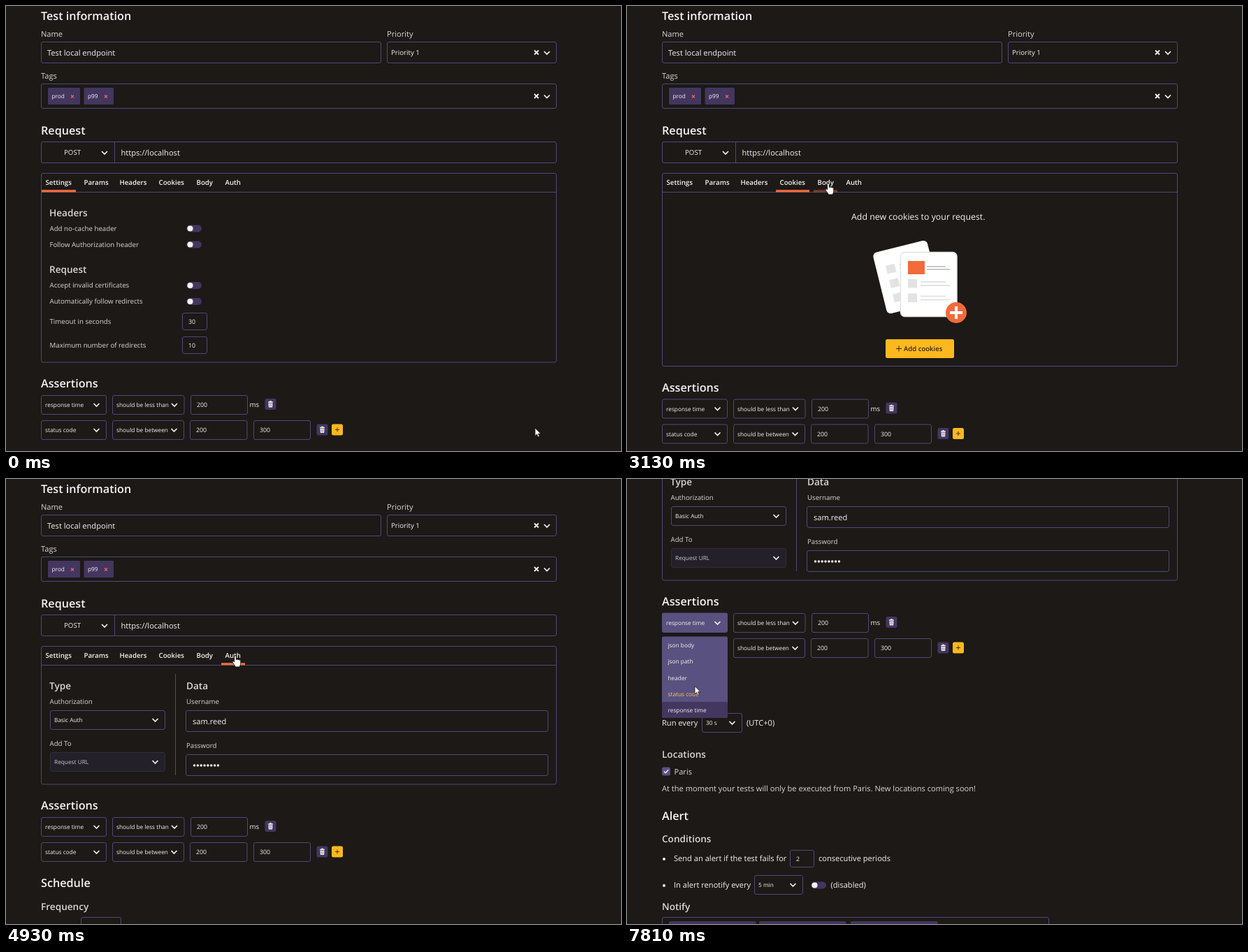
Recreate the animation shown at these times as an HTML page. Size 880x637 px, loop 8000 ms.

```html
<!DOCTYPE html>
<html lang="en">
<head>
<meta charset="utf-8">
<title>Test editor</title>
<style>
html, body { margin: 0; width: 100%; height: 100%; overflow: hidden; background: #1c1917; }
svg { display: block; font-family: "Open Sans", "Noto Sans", sans-serif; text-rendering: geometricPrecision; }
.code { font-family: "Noto Sans Mono", "DejaVu Sans Mono", monospace; }
</style>
</head>
<body>
<svg id="stage" width="880" height="637" viewBox="0 0 880 637"></svg>
<script>
const BG = '#1c1917', LINE = '#504876', PURPLE = '#43365f', LIGHT = '#59517f';
const WHITE = '#f5f3f3', SOFT = '#d9d6d4', YELLOW = '#fdb81e', ORANGE = '#f26b3a';
const DIM_BG = '#24202a', DIM_LINE = '#322d3b';

// Drawing helpers; a text's y is the middle of its capitals.
const esc = s => s.replace(/&/g, '&amp;').replace(/</g, '&lt;');
const text = (x, y, s, size = 11.1, fill = WHITE, weight = 400) =>
  `<text x="${x}" y="${y + size * .357}" font-size="${size}" fill="${fill}" font-weight="${weight}">${esc(s)}</text>`;
const title = (x, y, s) => text(x, y, s, 16.2, WHITE, 600);
const subtitle = (x, y, s) => text(x, y, s, 13.6, SOFT, 600);
const label = (x, y, s) => text(x, y, s, 9.7, SOFT);
const small = (x, y, s, fill) => text(x, y, s, 8.3, fill);
const rect = (x, y, w, h, fill, r = 0, more = '') =>
  `<rect x="${x}" y="${y}" width="${w}" height="${h}" rx="${r}" fill="${fill}" ${more}/>`;
const path = (d, stroke = WHITE, width = 1.6, fill = 'none') =>
  `<path d="${d}" stroke="${stroke}" stroke-width="${width}" fill="${fill}"/>`;
const dot = (x, y, r, fill = WHITE) => `<circle cx="${x}" cy="${y}" r="${r}" fill="${fill}"/>`;
const box = (x, y, w, h, fill = 'none', stroke = LINE) =>
  rect(x + .5, y + .5, w, h, fill, 2.5, `stroke="${stroke}"`);
const chevron = (x, y) => path(`M${x - 4} ${y - 2}l4 4 4-4`, WHITE, 1.7);
const cross = (x, y, r, color = WHITE, width = 1.8) =>
  path(`M${x - r} ${y - r}l${2 * r} ${2 * r}m0 ${-2 * r}l${-2 * r} ${2 * r}`, color, width);
const plus = (x, y, r, color, width) =>
  path(`M${x - r} ${y}h${2 * r}M${x} ${y - r}v${2 * r}`, color, width);
const select = (x, y, w, s, fill) =>
  box(x, y, w, 27, fill) + small(x + 6, y + 14.2, s) + chevron(x + w - 13.5, y + 14);
const input = (x, y, w, h, s) => box(x, y, w, h) + text(x + 9, y + h / 2 + .7, s, 8.8);
const toggle = (x, y) => rect(x, y - 5, 21.5, 10, PURPLE, 5) + dot(x + 5, y, 4.1);
const check = (x, y) => rect(x - 6, y - 6, 12, 12, LIGHT, 2.5) + path(`M${x - 3} ${y}l2.2 2.2 4-4.4`, WHITE, 1.5);
const trash = (x, y) => rect(x, y - 8, 16, 16, PURPLE, 2.5) +
  path(`M${x + 4.6} ${y - 3}h6.8M${x + 6.6} ${y - 4.2}h2.8`, WHITE, 1.3) +
  path(`M${x + 5} ${y - 1.6}h6l-.4 6h-5.2z`, 'none', 0, WHITE) +
  path(`M${x + 7} ${y - .6}v4m2-4v4`, PURPLE, .6);
const add = (x, y) => rect(x, y - 8, 16, 16, YELLOW, 2.5) + plus(x + 8, y, 3, '#4a3517', 1);
const group = (id, s) => `<g id="${id}">${s}</g>`;

const tabs = [
  ['Settings', 51, 100, 510], ['Params', 106, 151, 515.5], ['Headers', 157, 207, 557.5],
  ['Cookies', 213, 261, 515.5], ['Body', 267, 301, 665], ['Auth', 308, 342, 437]
].map(([name, left, right, bottom]) => ({ name, left, right, bottom }));

const tag = (x, w, s) => rect(x, 117, w, 24, PURPLE, 1.5) + small(x + 5.5, 129.5, s) +
  cross(x + w - 11, 129.5, 2, '#f2605c', 1.3);

const form = title(50, 14.5, 'Test information') +
  text(50, 40.5, 'Name', 11.1, SOFT) + box(50, 51, 486, 30) + text(59, 67, 'Test local endpoint') +
  text(545, 40.5, 'Priority', 11.1, SOFT) + box(545, 51, 242, 30) + text(551, 67, 'Priority 1', 9.7) +
  cross(759, 66.5, 3) + chevron(774, 67) +
  text(50, 100, 'Tags', 11.1, SOFT) + box(50, 111, 737, 35) + tag(60, 46, 'prod') + tag(111.5, 42.5, 'p99') +
  cross(759, 129, 3) + chevron(774, 129.5) +
  title(50, 178, 'Request') + box(50, 194, 737, 30) + path('M155.5 194.5v30', LINE, 1) +
  text(83, 210, 'POST', 9.7) + chevron(141, 210) + text(164.5, 210, 'https://localhost') +
  tabs.map(t => text(t.left + 5.5, 252.5, t.name, 9.7, WHITE, 600)).join('') +
  path('M50.5 266.5h737', LINE, 1);

const settings = subtitle(62, 296, 'Headers') + subtitle(62, 377.5, 'Request') +
  [['Add no-cache header', 318.5], ['Follow Authorization header', 341.5],
   ['Accept invalid certificates', 400], ['Automatically follow redirects', 423]]
    .map(([s, y]) => label(62.5, y, s) + toggle(258.5, y)).join('') +
  label(62.5, 452, 'Timeout in seconds') + input(252, 439, 35, 24, '30') +
  label(62.5, 485.5, 'Maximum number of redirects') + input(252, 473, 35, 24, '10');

const GREY = '#e3e3e3';
const sheet = `<g transform="translate(351 354) rotate(-14)">${rect(0, 0, 80, 90, '#fff', 6) +
  [12, 33, 54].map((y, i) => rect(14, y + 10, 13, 12, GREY) +
    path(`M33 ${y + 13}h30m-30 5h30`, GREY, 2)).join('')}</g>` +
  rect(391.5, 352.5, 80.5, 92, '#fff', 6, `stroke="${GREY}" stroke-width="1.5"`) +
  rect(402, 365, 24, 19, ORANGE) + path('M429 373h27m-27 4h33', '#c8c8c8', 2) +
  [391, 411.5].map(y => rect(402, y, 13, 12.5, GREY) +
    path(`M420 ${y + 4}h36m-36 5h42`, GREY, 2)).join('') +
  dot(471, 439, 15, ORANGE) + plus(471, 439, 9, '#fff', 4);
const empty = (x, what, bx, bw) => text(x, 301.5, `Add new ${what} to your request.`, 12.35) + sheet +
  rect(bx, 477, bw, 27, YELLOW, 2.5) + plus(bx + 19, 490.5, 4, '#33260f', 1) +
  text(bx + 26, 491, 'Add ' + what, 9.55, '#33260f', 600);

const fields = [['Owl-Duty-Id', '<set when request is sent>'], ['Host', '<set when request is sent>'],
  ['User-Agent', 'OwlDuty'], ['Accept', '*/*'], ['Accept-Encoding', 'gzip, deflate, br'],
  ['Connection', 'keep-alive'], ['Content-type', 'application/json']];
const headers = text(86, 285.5, 'KEY', 8.3, WHITE, 600) + text(317, 285.5, 'VALUE', 8.3, WHITE, 600) +
  fields.map((pair, i) => {
    const y = 314.8 + i * 36.45, last = i == 6;
    const cell = (x, s) => box(x, Math.round(y - 13), 217, 24, last ? BG : DIM_BG, last ? LINE : DIM_LINE) +
      small(x + 9, y + .3, s, last ? WHITE : '#cbc7cd');
    return check(68.5, y) + cell(83, pair[0]) + cell(311.5, pair[1]);
  }).join('') + trash(537.5, 533.5) + add(559.5, 533.5);

const user = [{
  id: 1, name: 'Marisa Tolver', username: 'Olin', email: 'Mellow@quill.test',
  address: {
    street: 'Fenro Court', suite: 'Apt. 417', city: 'Gwenborough', zipcode: '40317-2065',
    geo: { lat: '-37.3159', lng: '81.1496' }
  },
  phone: '1-555-010-0142 x30917', website: 'hildegard.org',
  company: {
    name: 'Romaguera-Crona', catchPhrase: 'Multi-layered client-server neural-net',
    bs: 'harness real-time e-markets'
  }
}];
const span = (s, fill) => `<tspan fill="${fill}">${s}</tspan>`;
const paint = s => s.replace(/("[^"]*")(:?)|\d+/g, (all, str, colon) =>
  !str ? span(all, '#eeebff') : colon ? span(str, '#9a86fd') + ':' : span(str, '#ffc48c'));
const code = rect(63, 279, 712, 371, '#2a2734') + rect(63, 281, 712, 15, '#322f40') +
  path('M101.5 279v371', '#c3c0cc', 1) +
  `<g class="code" font-size="9.36" fill="#6c6783">${JSON.stringify(user, null, 2).split('\n').map((s, i) => {
    const y = 289 + i * 14.29, indent = s.search(/\S/);
    return `<text x="77.5" y="${y + 3.3}" text-anchor="end" fill="#5b586f">${i + 1}</text>` +
      `<text x="${106 + indent * 5.61}" y="${y + 3.3}">${paint(s.trim())}</text>` +
      (/[[{]$/.test(s) ? path(`M81.5 ${y + 2}l2 1.5 2-1.5`, '#5b586f', 1) : '');
  }).join('')}</g>`;

const auth = subtitle(62, 296, 'Type') + subtitle(258, 296, 'Data') +
  label(62.5, 318.5, 'Authorization') + select(63, 331, 164, 'Basic Auth') +
  label(62.5, 378.5, 'Add To') + box(63, 391, 164, 27, DIM_BG, DIM_LINE) +
  small(69, 405.5, 'Request URL', '#cbc7cd') + chevron(213.5, 405) +
  path('M242.5 279v145', LINE, 1) +
  label(258, 318.5, 'Username') + box(257, 331, 518, 30) + text(267, 347, 'sam.reed') +
  label(258, 381.5, 'Password') + box(257, 394, 518, 30) +
  [0, 1, 2, 3, 4, 5, 6, 7].map(i => dot(269.5 + i * 4.85, 410, 1.75)).join('');

// Everything below the tab panel, measured from the panel's bottom edge.
const lower = title(50, 30.5, 'Assertions') +
  select(50, 47, 93, 'response time') +
  group('open', rect(50, 46.5, 94, 28, LIGHT, 2.5) + small(56, 61.2, 'response time') + chevron(129.5, 61)) +
  select(152, 47, 102.5, 'should be less than') + input(264, 47, 81, 27, '200') +
  text(348.5, 61, 'ms', 9.7) + trash(370.5, 60) +
  select(50, 83, 93, 'status code') + select(152, 83, 102, 'should be between') +
  input(263, 83, 81.5, 27, '200') + input(354, 83, 81, 27, '300') + trash(444.5, 96.5) + add(466, 96.5) +
  title(50, 141.5, 'Schedule') + subtitle(50, 175, 'Frequency') +
  text(50, 204.5, 'Run every') + select(107, 190, 57, '30 s') + text(171, 204.5, '(UTC+0)') +
  subtitle(50, 249.5, 'Locations') + check(56, 273.5) + text(67.5, 274, 'Paris', 11.1, SOFT) +
  text(50, 298.5, 'At the moment your tests will only be executed from Paris. New locations coming soon!', 11.1, SOFT) +
  title(50, 337.5, 'Alert') + subtitle(50, 370.5, 'Conditions') +
  dot(53, 399, 2) + text(67, 398.5, 'Send an alert if the test fails for') + input(233, 386, 34, 24, '2') +
  text(274, 398.5, 'consecutive periods') +
  dot(53, 437, 2) + text(67, 436.5, 'In alert renotify every') + select(182, 422, 69, '5 min') +
  toggle(263.5, 436.5) + text(291.5, 436.5, '(disabled)') +
  subtitle(50, 467, 'Notify') + box(50, 482, 553, 36) +
  [60, 189, 320].map(x => rect(x, 488, 124.5, 24, PURPLE, 1.5)).join('') +
  group('menu', rect(50, 80.5, 94, 116.5, LIGHT, 2.5) + rect(50, 174, 94, 23, PURPLE, 2.5) +
    ['json body', 'json path', 'header', 'status code', 'response time']
      .map((s, i) => group('item' + i, small(58.5, 93 + i * 23.3, s, 'currentColor'))).join(''));

const hand = path('M-1.3 1.2c0-1.7 2.6-1.7 2.6 0v4.6l.5-.1c.3-1 2-.8 2.1.2.5-.8 1.9-.5 2 .5.6-.6 1.8-.2 1.8.9v3.3' +
  'c0 2.6-1.2 4-1.5 5.3h-5.8c-.6-2-3.6-4.6-4.2-6.9-.3-1.4 1.3-1.8 2.1-.6l.4.6z', '#111', .8, '#fff');
const arrow = path('M0 0V11.4L2.6 9 4.3 13 6.3 12.1 4.6 8.2H8.2z', '#111', .8, '#fff');

const panels = [settings, empty(293, 'query parameters', 348, 141.5), headers,
  empty(321, 'cookies', 370, 98), code, auth];
const $ = id => document.getElementById(id);
$('stage').innerHTML = rect(0, 0, 880, 637, BG) +
  group('page', form + '<rect id="frame" x="50.5" y="239.5" width="737" rx="2.5" fill="none" stroke="' + LINE + '"/>' +
    rect(0, 263.2, 0, 3.2, ORANGE, 0, 'id="hover" opacity=".4"') + rect(0, 263.2, 0, 3.2, ORANGE, 0, 'id="active"') +
    panels.map((p, i) => group('panel' + i, p)).join('') + group('lower', lower)) +
  group('pointer', group('arrow', arrow) + group('hand', hand));

const LOOP = 8000;
const clicks = [0, 1080, 1950, 2790, 3350, 4770];
const moves = [[0, 757, 604], [40, 757, 604], [330, 188, 264], [390, 182, 278], [550, 182, 278], [900, 133, 254],
  [1250, 133, 254], [1650, 202, 256], [1820, 193, 256], [2180, 193, 256], [2440, 230, 254], [2730, 240, 256],
  [2880, 240, 256], [3130, 288, 254], [3400, 288, 254], [3530, 298, 253], [3910, 328, 254], [4770, 328, 254],
  [4930, 328, 253], [5370, 328, 253], [5490, 246, 256], [5710, 246, 256], [5770, 239, 256], [5960, 239, 256],
  [6300, 87, 250], [6520, 87, 250], [6690, 100, 214], [6770, 100, 214], [7550, 102, 202], [7590, 102, 202], [7810, 97, 296.5]];

const ramp = (t, a, b) => Math.min(1, Math.max(0, (t - a) / (b - a)));
const ease = k => k * k * (3 - 2 * k);
function pointerAt(t) {
  const i = moves.findIndex(m => m[0] > t);
  if (i < 0) return moves.at(-1).slice(1);
  const [a, x, y] = moves[i - 1], [b, x2, y2] = moves[i], k = ease(ramp(t, a, b));
  return [x + (x2 - x) * k, y + (y2 - y) * k];
}
const set = (id, attrs) => { for (const a in attrs) $(id).setAttribute(a, attrs[a]); };
const show = (id, on) => { $(id).style.display = on ? '' : 'none'; };
const underline = (id, tab) => set(id, { x: tab ? tab.left : 0, width: tab ? tab.right - tab.left : 0 });

function draw(t) {
  const current = clicks.filter(c => c <= t).length - 1, tab = tabs[current];
  const scroll = 292 * ease(ramp(t, 6020, 6450));
  const [x, y] = pointerAt(t);
  const over = scroll ? null : tabs.find(p => y > 240 && y < 267 && x > p.left && x < p.right);

  panels.forEach((_, i) => show('panel' + i, i == current));
  underline('active', tab);
  underline('hover', over == tab ? null : over);
  set('frame', { height: tab.bottom - 239.5 });
  set('lower', { transform: `translate(0 ${tab.bottom})` });
  set('page', { transform: `translate(0 ${-scroll})` });

  set('open', { opacity: ramp(t, 6770, 6950) });
  set('menu', { opacity: ramp(t, 6770, 7070) });
  for (let i = 0; i < 5; i++) {
    const top = 226 + i * 23.3;
    $('item' + i).style.color = y >= top && y < top + 23.3 ? '#ffc45e' : WHITE;
  }

  show('hand', over);
  show('arrow', !over);
  set('pointer', { transform: `translate(${x} ${y})` });
}

const start = performance.now();
(function tick() {
  draw((performance.now() - start) % LOOP);
  requestAnimationFrame(tick);
})();
</script>
</body>
</html>
```
